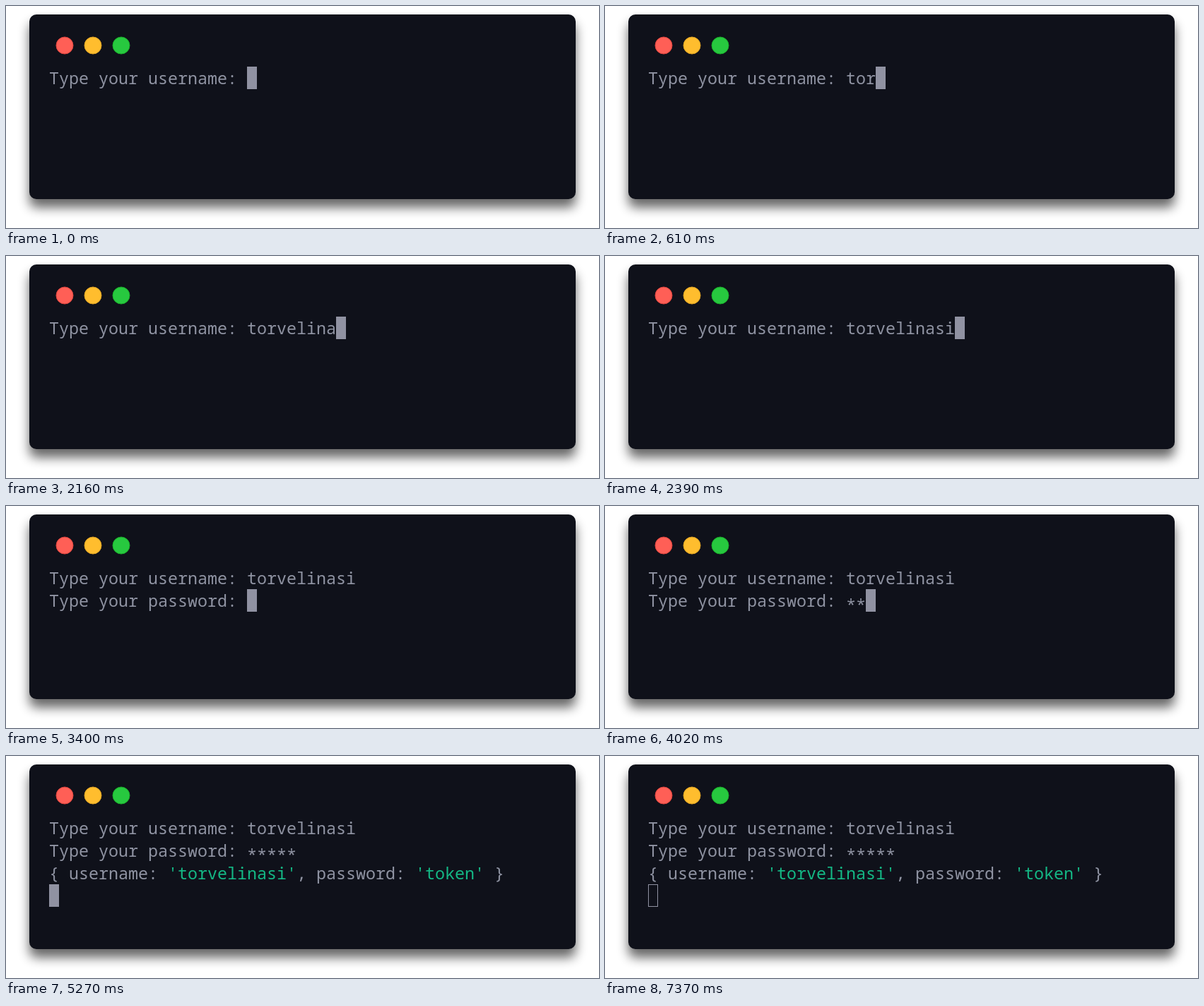
These frames come from a looping animation (839 by 315 pixels, 7.46 s). An HTML page:

```html
<!DOCTYPE html>
<html lang="en">
<head>
<meta charset="utf-8">
<title>Terminal login</title>
<style>
  html, body { margin: 0; width: 100%; height: 100%; overflow: hidden; background: #fff; }
  svg { display: block; width: 100%; height: 100%; }
  text {
    font: 23.333px "Roboto Mono", "Noto Sans Mono", "DejaVu Sans Mono", monospace;
    fill: #8f93a2;
    white-space: pre;
    font-variant-ligatures: none;
  }
  .string { fill: #14b885; }
</style>
</head>
<body>
<svg viewBox="0 0 839 315">
  <defs>
    <filter id="blur" filterUnits="userSpaceOnUse" x="0" y="0" width="839" height="315">
      <feGaussianBlur stdDeviation="8"/>
    </filter>
  </defs>
  <rect x="33" y="24" width="773" height="262" rx="10" fill="#000" opacity=".6" filter="url(#blur)"/>
  <rect x="33" y="12" width="773" height="262" rx="10" fill="#0f111a"/>
  <circle cx="83" cy="56" r="12" fill="#ff5f56" stroke="#e0443e"/>
  <circle cx="123" cy="56" r="12" fill="#ffbd2e" stroke="#dea123"/>
  <circle cx="163" cy="56" r="12" fill="#27c93f" stroke="#1aab29"/>

  <text x="61" y="111">Type your username: <tspan id="user"></tspan></text>
  <g id="passwordLine">
    <text x="61" y="143">Type your password: </text>
    <text id="stars" x="341" y="149"></text>
  </g>
  <text id="result" x="61" y="175">{ username: <tspan class="string" id="userValue"></tspan>, password: <tspan class="string">'token'</tspan> }</text>

  <g id="cursor">
    <rect width="14" height="32" fill="#9092a2"/>
    <rect id="hollow" x="1" y="1" width="12" height="30" fill="#0f111a"/>
  </g>
</svg>
<script>
  const LOOP = 7460;
  const CELL = 14, ROW = 32, LEFT = 61, TOP = 86;
  const PROMPT = 20;
  const USER = 'torvelinasi';

  const userKeys = [380, 530, 610, 990, 1300, 1380, 1930, 2080, 2160, 2310, 2390];
  const passKeys = [3700, 4020, 4250, 4420, 4720];
  const USER_ENTER = 3400, PASS_ENTER = 5270, BLUR = 7370;

  const el = id => document.getElementById(id);
  const show = (id, on) => el(id).setAttribute('visibility', on ? 'visible' : 'hidden');
  const typed = (keys, t) => keys.filter(k => k <= t).length;

  function moveCursor(col, row) {
    el('cursor').setAttribute('transform', `translate(${LEFT + col * CELL} ${TOP + row * ROW})`);
  }

  function draw(t) {
    const u = typed(userKeys, t), p = typed(passKeys, t);
    el('user').textContent = USER.slice(0, u);
    el('stars').textContent = '*'.repeat(p);
    show('passwordLine', t >= USER_ENTER);
    show('result', t >= PASS_ENTER);
    show('hollow', t >= BLUR);

    if (t >= PASS_ENTER) moveCursor(0, 3);
    else if (t >= USER_ENTER) moveCursor(PROMPT + p, 1);
    else moveCursor(PROMPT + u, 0);
  }

  el('userValue').textContent = `'${USER}'`;
  const start = performance.now();
  function tick() {
    draw((performance.now() - start) % LOOP);
    requestAnimationFrame(tick);
  }
  tick();
</script>
</body>
</html>
```
